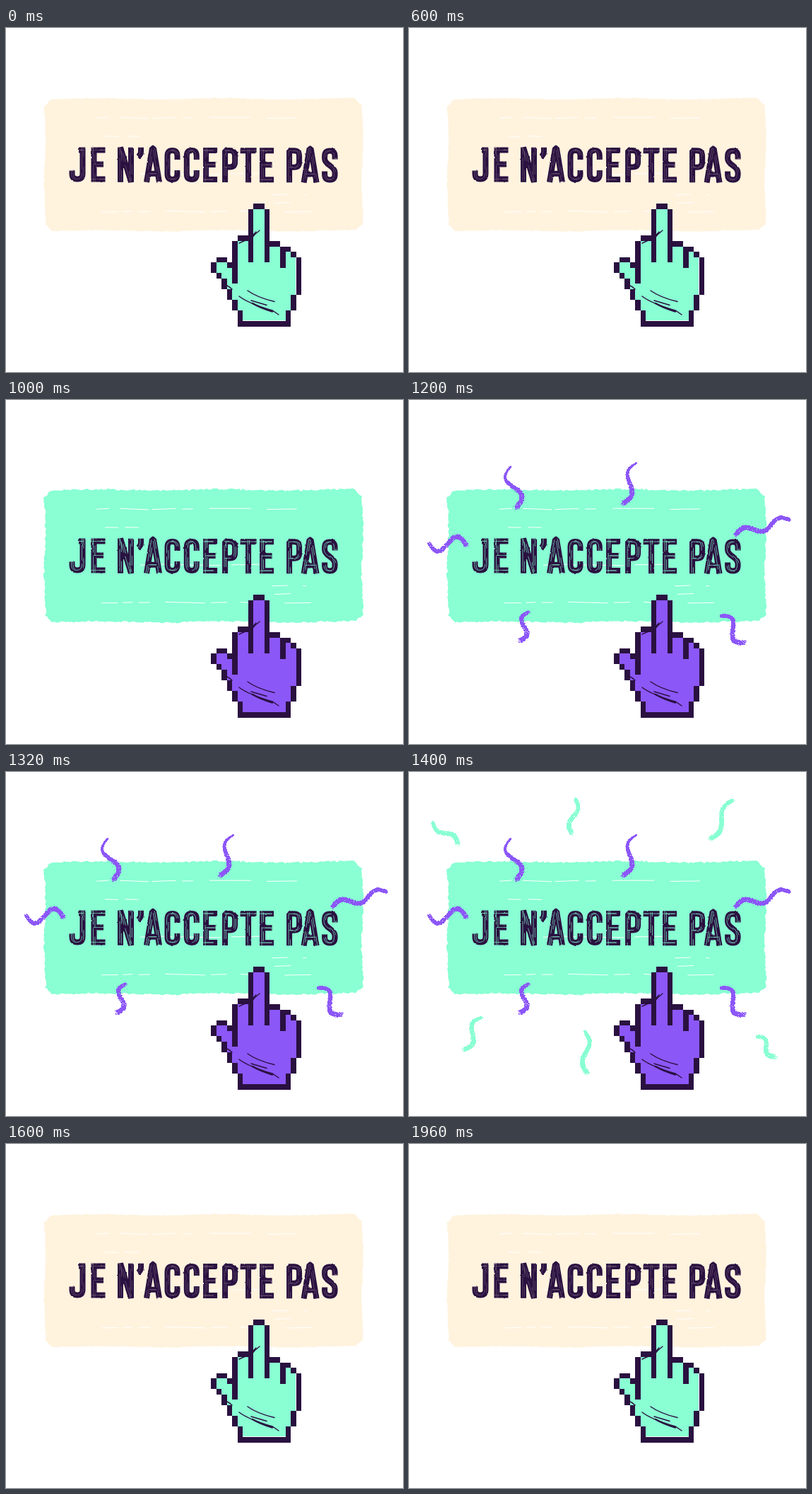
An HTML page for the animation above (2.2 s loop, 562x486 px).

```html
<!DOCTYPE html>
<html lang="fr">
<head>
<meta charset="utf-8">
<title>Je n’accepte pas</title>
<style>
  html, body { margin: 0; width: 100%; height: 100%; overflow: hidden; background: #fff; }
  svg { display: block; width: 100vw; height: 100vh; }
</style>
</head>
<body>
<svg viewBox="0 0 562 486" role="img" aria-label="JE N’ACCEPTE PAS">
  <defs>
    <filter id="rough" x="-5%" y="-20%" width="110%" height="140%" color-interpolation-filters="sRGB">
      <feTurbulence type="fractalNoise" baseFrequency=".15" numOctaves="2" seed="4"/>
      <feDisplacementMap in="SourceGraphic" scale="2" xChannelSelector="R" yChannelSelector="G"/>
    </filter>
    <!-- One unit is one big pixel of the hand. -->
    <path id="palm" d="M8 1H10V8H13V9H15V10H16V17H15V20H14V22H6V20H5V18H4V16H3V14H2V13H1V11H3V12H5V7H8Z"/>
  </defs>
  <g id="button">
    <path id="panel"/>
    <path id="scratches" fill="none" stroke="#fff"/>
    <g id="lettering" fill="none" stroke="#2a1140" stroke-width="8" filter="url(#rough)"></g>
    <g transform="translate(290 248) scale(7.55 7.565)" shape-rendering="crispEdges">
      <g fill="#2a1140">
        <use href="#palm" x="-1"/><use href="#palm" x="1"/>
        <use href="#palm" y="-1"/><use href="#palm" y="1"/>
      </g>
      <use id="skin" href="#palm"/>
      <path id="gap" d="M6 21.93H14M15.93 10V17" stroke="#fff" stroke-width=".13"/>
      <path d="M7.5 7V11M10.5 8V11M13.5 9V12M4.5 12V15M5 22.5H15" stroke="#2a1140"/>
    </g>
    <g fill="none" stroke="#2a1140" stroke-width="1.4" stroke-linecap="round">
      <path d="M359 286Q352 291 347 298M354 288Q346 298 330 304M311 363Q316 365 320 369"/>
      <path d="M342 371Q356 381 380 386.5M347 385L369 391.5M330 379Q343 389 377 399L386 405"/>
      <path d="M349 389Q361 396 377 400.5" stroke-width="2.4"/>
    </g>
  </g>
  <g id="purpleBurst" fill="#8c57f7" shape-rendering="crispEdges"></g>
  <g id="mintBurst" fill="#89ffd3" shape-rendering="crispEdges"></g>
</svg>
<script>
const CREAM = '#fff3de', MINT = '#89ffd3', PURPLE = '#8c57f7';
const LOOP = 2200, PRESS = 1000, BURST = 1200, SECOND_BURST = 1400, RELEASE = 1600;
const PRESS_DEPTH = 27;
const $ = id => document.getElementById(id);

function randomizer(seed) {
  return () => (seed = (seed * 16807) % 2147483647) / 2147483647;
}

function addPath(parent, attributes) {
  const path = document.createElementNS('http://www.w3.org/2000/svg', 'path');
  for (const name in attributes) path.setAttribute(name, attributes[name]);
  parent.append(path);
  return path;
}

// Brushed rectangle: cut corners, slow waves and a fine seeded jitter.
function brushedPanel(jitter) {
  const random = randomizer(71);
  const left = 55, right = 504.5, top = 100, bottom = 286.5, cut = 10;
  const corners = [
    [left, top + cut], [left + cut, top], [right - cut, top], [right, top + cut],
    [right, bottom - cut], [right - cut, bottom], [left + cut, bottom], [left, bottom - cut]
  ];
  const points = [];
  corners.forEach(([x, y], i) => {
    const [nextX, nextY] = corners[(i + 1) % corners.length];
    const steps = Math.ceil(Math.hypot(nextX - x, nextY - y) / 3);
    for (let s = 0; s < steps; s++) {
      const px = x + (nextX - x) * s / steps, py = y + (nextY - y) * s / steps;
      points.push([
        px + Math.sin(py / 20) + (random() - .5) * jitter,
        py + Math.sin(px / 28) + (random() - .5) * jitter
      ].map(v => v.toFixed(1)));
    }
  });
  return 'M' + points.join('L') + 'Z';
}
const calmPanel = brushedPanel(1.4);
const jaggedPanel = brushedPanel(2.6);

// Dry-brush streaks: each band is broken into strokes of random length.
function streaks(y, from, to) {
  const random = randomizer(y * 97);
  let d = '';
  for (let x = from; x < to;) {
    const end = Math.min(to, x + 12 + random() * 60);
    d += `M${x} ${y + random() * 2}L${end} ${y + random() * 2}`;
    x = end + 3 + random() * 20;
  }
  return d;
}
$('scratches').setAttribute('d',
  streaks(126, 128, 420) + streaks(152, 140, 193) + streaks(205, 190, 362) +
  streaks(235, 376, 425) + streaks(246, 380, 409) + streaks(258, 135, 432));

// Brush lettering: advance width and stroke skeleton, 49 units high.
const glyphs = {
  J: [31, 'M19.5 0V37Q19.5 45 12 45Q4.5 45 4.5 37V33M14 4H20'],
  E: [27, 'M4.5 0V49M1 4H20.5M4.5 24H18M1 45H20.5'],
  N: [28, 'M4 49V0L19 49V0'],
  '’': [9, 'M5 0V6Q5 10 1 13'],
  A: [29, 'M4 49L12 1H14L22 49M7 37H19'],
  C: [27.3, 'M18.5 17V12Q18.5 4 11.5 4Q4.5 4 4.5 12V37Q4.5 45 11.5 45Q18.5 45 18.5 37V32'],
  P: [26, 'M4.5 49V4H11Q18.5 4 18.5 12V20Q18.5 27.5 11 27.5H4.5'],
  T: [27, 'M0 4H23M11.5 2V49'],
  S: [27, 'M19 16V12Q19 4 12 4Q4.5 4 4.5 12V15Q4.5 20 12 25Q19 30 19 35V37Q19 45 12 45Q4.5 45 4.5 37V33'],
  ' ': [11, '']
};
const kerning = { PA: -5 };
const inlines = [];

function letter(text, x, y) {
  [...text].forEach((char, i) => {
    const [advance, d] = glyphs[char];
    const place = (dx, extra) => addPath($('lettering'), {
      d, transform: `translate(${x + dx} ${y + i / 16})`, 'stroke-linejoin': 'bevel', ...extra
    });
    place(0);
    inlines.push(place(-1, { 'stroke-dasharray': '31 5', 'stroke-dashoffset': i * 11 }));
    inlines.push(place(1.4, { 'stroke-dasharray': '14 13', 'stroke-dashoffset': i * 17 }));
    x += advance + (kerning[char + text[i + 1]] || 0);
  });
}
letter('JE N’ACCEPTE PAS', 89, 168.5);

// Chalky wave of seeded specks between two points.
function chalk(layer, { from, to, sway, cycles = 1, tip = 5 }, index) {
  const random = randomizer(101 + index * 37);
  const dx = to[0] - from[0], dy = to[1] - from[1], length = Math.hypot(dx, dy);
  const samples = Math.round(length * 2);
  let d = '';
  for (let s = 0; s <= samples; s++) {
    const u = s / samples;
    const offset = sway * Math.sin(u * cycles * 2 * Math.PI) / length;
    const x = from[0] + dx * u - dy * offset;
    const y = from[1] + dy * u + dx * offset;
    const width = tip + (7 - tip) * Math.min(1, u * 1.6);
    for (let n = 0; n < 14; n++) {
      const angle = random() * Math.PI * 2, reach = Math.sqrt(random()) * width / 2;
      const px = Math.round(x + Math.cos(angle) * reach - .5);
      const py = Math.round(y + Math.sin(angle) * reach - .5);
      d += `M${px} ${py}h1v1h-1z`;
    }
  }
  addPath(layer, { d });
}

[
  { from: [144, 94], to: [152, 152], sway: 10, tip: 2 },
  { from: [322, 89], to: [303, 146], sway: 8, tip: 2 },
  { from: [538, 169], to: [463, 190], sway: 6, cycles: 1.5 },
  { from: [28, 202], to: [81, 205], sway: 11 },
  { from: [169, 300], to: [157, 340], sway: 7 },
  { from: [442, 305], to: [475, 343], sway: -9 }
].forEach((wave, i) => chalk($('purpleBurst'), wave, i));

[
  { from: [34, 72], to: [69, 101], sway: 5 },
  { from: [236, 39], to: [230, 86], sway: -5 },
  { from: [458, 40], to: [427, 94], sway: 6 },
  { from: [102, 347], to: [78, 392], sway: 7 },
  { from: [249, 367], to: [252, 425], sway: -6 },
  { from: [493, 374], to: [518, 402], sway: -6 }
].forEach((wave, i) => chalk($('mintBurst'), wave, i));

function show(id, visible) {
  $(id).setAttribute('visibility', visible ? 'visible' : 'hidden');
}

function render(time) {
  const t = time % LOOP;
  const pressed = t >= PRESS && t < RELEASE;
  const panelColor = pressed ? MINT : CREAM;

  $('button').setAttribute('transform', `translate(0 ${pressed ? PRESS_DEPTH : 0})`);
  $('panel').setAttribute('d', pressed ? jaggedPanel : calmPanel);
  $('panel').setAttribute('fill', panelColor);
  $('skin').setAttribute('fill', pressed ? PURPLE : MINT);
  for (const line of inlines) {
    line.setAttribute('stroke', panelColor);
    line.setAttribute('stroke-width', pressed ? .9 : .5);
    line.setAttribute('stroke-opacity', pressed ? .7 : .4);
  }
  show('gap', !pressed);
  show('purpleBurst', pressed && t >= BURST);
  show('mintBurst', pressed && t >= SECOND_BURST);
}

const start = performance.now();
function tick() {
  render(performance.now() - start);
  requestAnimationFrame(tick);
}
tick();
</script>
</body>
</html>
```
